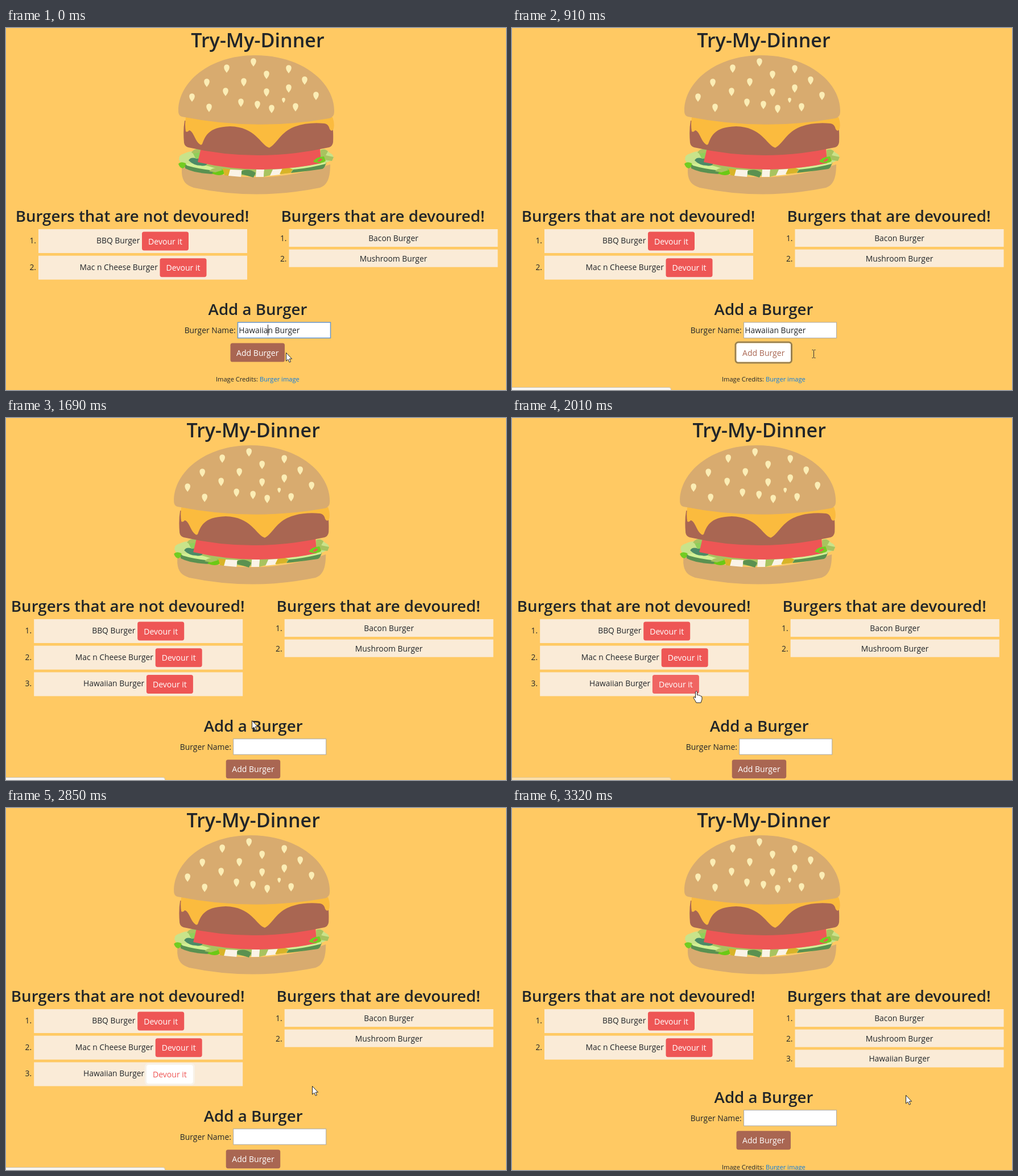
Write an HTML page that moves like this. It is 879 px wide and 637 px high and loops after 3800 ms.

```html
<!DOCTYPE html>
<html lang="en">
<head>
<meta charset="utf-8">
<title>Burger list</title>
<style>
html, body { margin: 0; width: 100%; height: 100%; overflow: hidden; background: #ffc963; }
svg { display: block; width: 100vw; height: 100vh; }
text { font: 13.85px "Open Sans", "Noto Sans", sans-serif; fill: #212529; }
.mid { text-anchor: middle; }
.end { text-anchor: end; }
.h1 { font-size: 34.1px; font-weight: 600; }
.h2 { font-size: 27.65px; font-weight: 600; }
.small { font-size: 11.1px; }
.btn text { font-size: 14.05px; fill: #fff; }
.ring { fill: none; stroke-width: 3; opacity: 0; }
</style>
</head>
<body>
<svg id="stage" viewBox="0 0 879 637" preserveAspectRatio="none"></svg>
<script>
const LOOP = 3800;
const RED = '#ee5655', BROWN = '#a96652', CREAM = '#faebd7';

const text = (x, y, str, cls = '') => `<text x="${x}" y="${y}" class="${cls}">${str}</text>`;
const rect = (x, y, w, h, attrs) => `<rect x="${x}" y="${y}" width="${w}" height="${h}" ${attrs}/>`;
const path = (fill, d) => `<path fill="${fill}" d="${d}"/>`;

function button(id, x, y, w, label, fill, glow) {
  return `<g class="btn" id="${id}">
    ${rect(x - 1.5, y - 1.5, w + 3, 36, `rx="4.8" class="ring" stroke="${glow}"`)}
    ${rect(x, y, w, 33, `rx="3.7" class="face" fill="${fill}"`)}
    ${text(x + w / 2, y + 22, label, 'mid')}</g>`;
}

// Uneaten burgers: name and button share one centred line.
function todoRow(i, name, split) {
  const y = 354 + i * 46.7;
  return `<g id="todo${i}">${rect(57, y, 367, 42, `fill="${CREAM}"`)}
    ${text(53, y + 25, i + 1 + '.', 'end')}
    ${text(split, y + 25, name, 'end')}
    ${button('eat' + i, split + 3.7, y + 4.5, 82, 'Devour it', RED, 'rgba(248,249,250,.5)')}</g>`;
}

function doneRow(i, name) {
  const y = 354 + i * 35.7;
  return `<g id="done${i}">${rect(497.5, y, 367, 31, `fill="${CREAM}"`)}
    ${text(493.5, y + 21, i + 1 + '.', 'end')}
    ${text(681, y + 21, name, 'mid')}</g>`;
}

function burger() {
  const seeds = [[435, 61], [388, 72], [458, 83], [497, 73], [353, 97], [418, 96], [525, 93],
    [327, 123], [386, 113], [458, 114], [497, 107], [545, 120], [357, 141], [413, 132],
    [442, 136], [467, 143], [509, 140], [488, 127.5, .6]];
  const seed = ([x, y, s = 1]) => `<path fill="#fbedb5" transform="translate(${x} ${y}) scale(${s})"
    d="M0 7C-2 4-4.8 1-4.8-3A4.8 4.8 0 0 1 4.8-3C4.8 1 2 4 0 7Z"/>`;
  return [
    // bottom bun
    ['#d8ab6f', 'M309 240V255C310 270 317 277 330 281Q440 304 552 281C566 276 570 262 570 240Q440 285 309 240Z'],
    // lettuce and onion
    ['#a8c360', 'M335 236Q440 256 552 237L540 246Q440 272 360 250Z'],
    ['#c9e38a', 'M304 231Q304 223 313 221Q327 214 340 219L346 236Q326 249 309 241Z'],
    ['#a8c360', 'M326 219Q331 211 344 213L341 222Q334 222 329 221Z'],
    ['#8fcf5a', 'M329 221L342 219L339 231L333 229Z'],
    ['#72cc22', 'M303 239Q307 234 316 238Q318 244 311 247Q305 246 303 239Z'],
    ['#5a9150', 'M315 241Q344 243 372 250L368 257Q332 256 315 247Z'],
    ['#d2f095', 'M318 239Q340 237 369 247L366 251Q338 248 318 242Z'],
    ['#4b8b66', 'M321 233Q325 226 335 230Q350 228 354 238Q352 244 342 242Q330 242 321 233Z'],
    ['#6bc915', 'M362 256Q370 246 381 249L384 256Q376 262 362 256Z'],
    ['#a8c360', 'M357 252Q363 245 375 247L381 250L368 254Z'],
    ['#d8b428', 'M381 247L397 249L391 260L384 259Z'],
    ['#faf3e6', 'M394 249L415 250L413 262L391 260Z'],
    ['#5a9150', 'M414 252Q426 246 439 255L435 263Q424 260 414 257Z'],
    ['#faf3e6', 'M440 249H454L453 262H439Z'],
    ['#a8c360', 'M454 249L470 249L464 259L453 262Z'],
    ['#faf3e6', 'M469 249L486 248L482 258L464 260Z'],
    ['#d8b428', 'M486 247L506 245L500 255L481 257Z'],
    ['#5a9150', 'M506 248Q535 244 563 237Q560 247 556 248Q530 252 501 255Z'],
    ['#d2f095', 'M498 246Q530 244 562 235L562 239Q532 247 505 249Z'],
    ['#c9e38a', 'M553 214Q562 211 568 219Q578 224 575 230Q566 238 554 238Z'],
    ['#a8c360', 'M553 215Q560 211 566 217L562 224L576 227L573 234L553 231Z'],
    // tomato
    [RED, 'M343 211H552L554 238Q446 261 337 236Z'],
    ['#72cc22', 'M540 235Q544 227 559 226L562 234Q552 241 540 235Z'],
    [RED, 'M547 235Q551 229 556 230Q555 236 547 235Z'],
    // patty
    [BROWN, 'M314 163Q311 180 313 202Q314 208 320 210Q442 238 568 210Q574 208 575 201Q576 180 573 165Q440 170 314 163Z'],
    // cheese
    ['#fbbb3e', 'M316 157H574Q578 167 576 177Q573 184 569 178Q567 169 560 168Q526 165 502 176C482 186 475 204 464 210Q463 211 461 210C448 205 438 174 394 173C354 174 350 192 345 204Q343 207 340 204C332 198 330 182 322 180Q319 184 316 182Q314 170 316 157Z'],
    // top bun
    ['#d8ab6f', 'M303 147C302 97 356 48 438 48C522 48 578 97 577 147Q577 157 568 159Q440 182 309 156Q303 154 303 147Z']
  ].map(([fill, d]) => path(fill, d)).join('') + seeds.map(seed).join('');
}

const outline = 'fill="#fff" stroke="#222" stroke-width="1" stroke-linejoin="round"';
const pointers = {
  arrow: `<path ${outline} d="M.5.5V15L3.8 12L6.2 17.2L8.5 16.2L6.2 11.2H10.6Z"/>`,
  hand: `<path ${outline} transform="translate(-5.5 0)" d="M4 1.8Q5.5-.4 7 1.8V7.5Q9 6.6 10 8.2Q12 7.6 13 9.2Q15.5 9 15.5 12V15L13.5 21H5.5L3 16.5L.6 12.5Q.6 10 2.7 11L4 12.5Z"/>`,
  beam: '<path fill="none" stroke="#333" d="M-3-6.5H-1L0-5.5L1-6.5H3M0-5.5V6.5M-3 7.5H-1L0 6.5L1 7.5H3"/>'
};

const $ = id => document.getElementById(id);

$('stage').innerHTML = `
  ${rect(0, 0, 879, 637, 'fill="#ffc963"')}
  <g id="page">
    ${text(442.5, 34, 'Try-My-Dinner', 'h1 mid')}
    ${burger()}
    ${text(222, 341, 'Burgers that are not devoured!', 'h2 mid')}
    ${text(662.5, 341, 'Burgers that are devoured!', 'h2 mid')}
    ${todoRow(0, 'BBQ Burger', 235.3)}
    ${todoRow(1, 'Mac n Cheese Burger', 266.8)}
    ${todoRow(2, 'Hawaiian Burger', 251)}
    ${doneRow(0, 'Bacon Burger')}
    ${doneRow(1, 'Mushroom Burger')}
    ${doneRow(2, 'Hawaiian Burger')}
    <g id="form">
      ${text(442.5, 505, 'Add a Burger', 'h2 mid')}
      ${text(403.7, 537, 'Burger Name:', 'end')}
      ${rect(407.5, 518, 163, 27.5, 'id="field" fill="#fff"')}
      ${text(409.3, 537, 'Hawaiian Burger').replace('<text', '<text id="typed"')}
      ${rect(460, 522, 1, 19, 'id="caret" fill="#222"')}
      ${button('add', 394.5, 554.6, 95.5, 'Add Burger', BROWN, 'rgba(52,58,64,.5)')}
      ${text(369, 622, 'Image Credits: <tspan fill="#0a7be0">Burger image</tspan>', 'small')}
    </g>
  </g>
  <path id="status" d="M-1 632.5H276Q279.5 632.5 279.5 636V640H-1Z" fill="#f8f6f2" stroke="#cbc3b3"/>
  <g id="cursor">
    <circle id="press" r="14" fill="#f6e32c" opacity=".75"/>
    ${Object.keys(pointers).map(k => `<g id="${k}">${pointers[k]}</g>`).join('')}
  </g>`;

// Step tables: each row holds from its time until the next row.
const cursorSteps = [
  [0, 'arrow', 492, 571], [70, 'hand', 488, 572], [140, 'hand', 485, 573], [220, 'hand', 484, 573],
  [770, 'arrow', 497, 573], [840, 'beam', 518, 573], [910, 'beam', 530.5, 573],
  [1530, 'beam', 521, 568], [1610, 'arrow', 482, 552], [1690, 'arrow', 432, 532],
  [1770, 'arrow', 387, 512], [1850, 'arrow', 352, 497], [1930, 'arrow', 332, 488],
  [2010, 'hand', 324, 480], [2560, 'hand', 326, 481], [2630, 'arrow', 370, 486],
  [2700, 'arrow', 422, 488], [2780, 'arrow', 471, 489], [2850, 'arrow', 538, 489],
  [2960, 'arrow', 592, 493], [3030, 'arrow', 628, 498], [3110, 'arrow', 657, 501],
  [3180, 'arrow', 677, 504], [3250, 'arrow', 688, 505], [3320, 'arrow', 692, 505]
];
// time, face, label, ring opacity
const addSteps = [
  [0, BROWN, '#fff', 0], [70, '#bd8a7a', '#f6e9e5', 0], [140, '#e6d4ce', '#b98070', 0],
  [220, '#fff', BROWN, 0], [450, '#e1e1e1', '#b07a6c', 0], [530, '#f3f2f1', BROWN, .6],
  [600, '#fff', BROWN, 1], [1140, BROWN, '#fff', 0]
];
const eatSteps = [
  [0, RED, '#fff', 0], [2010, '#f06562', '#fff', 0], [2070, '#f8b9b8', '#f17a78', 0],
  [2150, '#fff', RED, 0], [2320, '#e3e3e3', '#e8706e', 0], [2400, '#f3f3f3', RED, .6],
  [2480, '#fff', RED, 1]
];
// time, x shift, form shift, third row left, third row right
const pageSteps = [[0, 0, 0, 0, 0], [1140, -7.8, 46.7, 1, 0], [2960, 0, 13.7, 0, 1]];
const statusSteps = [[0, 0], [840, 1], [1930, .75], [2010, .5], [2070, .25], [2150, 0],
  [2560, 1], [3110, .5], [3180, 0]];
const pressSteps = [[0, 0], [450, 1], [600, 0], [2320, 1], [2480, 0]];

const at = (steps, t) => steps.findLast(s => s[0] <= t).slice(1);
const show = (id, on) => $(id).setAttribute('visibility', on ? 'visible' : 'hidden');
const move = (id, x, y) => $(id).setAttribute('transform', `translate(${x} ${y})`);

function paint(id, [face, label, ring]) {
  const g = $(id);
  g.querySelector('.face').setAttribute('fill', face);
  g.querySelector('text').style.fill = label;
  g.querySelector('.ring').style.opacity = ring;
}

function draw(t) {
  const [dx, dy, left, right] = at(pageSteps, t);
  move('page', dx, 0);
  move('form', 0, dy);
  show('todo2', left);
  show('done2', right);

  const focused = t < 450;
  show('typed', t < 1140);
  show('caret', focused);
  $('field').setAttribute('stroke', focused ? '#6596cf' : '#a9a9a9');
  $('field').setAttribute('stroke-width', focused ? 1.5 : 1);

  paint('add', at(addSteps, t));
  paint('eat2', at(eatSteps, t));
  $('status').setAttribute('opacity', at(statusSteps, t)[0]);

  const [kind, x, y] = at(cursorSteps, t);
  move('cursor', x, y);
  for (const k in pointers) show(k, k === kind);
  show('press', at(pressSteps, t)[0]);
}

const start = performance.now();
function tick() {
  draw((performance.now() - start) % LOOP);
  requestAnimationFrame(tick);
}
tick();
</script>
</body>
</html>
```
